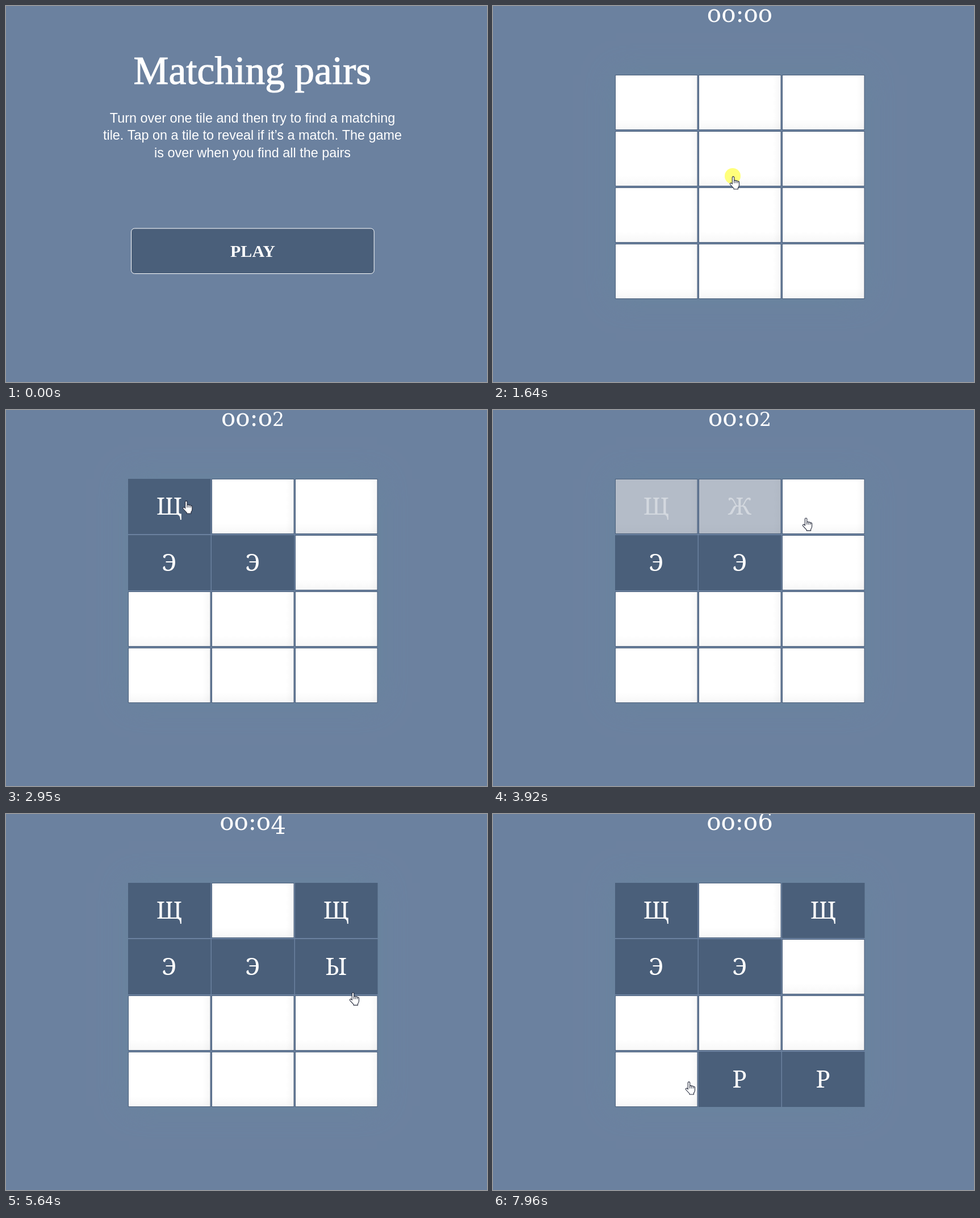
An HTML page with a canvas for the animation above (8 s loop, 847 by 661 pixels).

```html
<!DOCTYPE html>
<html lang="en">
<head>
<meta charset="utf-8">
<title>Matching pairs</title>
<style>
  html, body { margin: 0; width: 100%; height: 100%; overflow: hidden; background: #6b819f; }
  canvas { display: block; }
</style>
</head>
<body>
<canvas id="stage" width="847" height="661"></canvas>
<script>
const ctx = document.getElementById('stage').getContext('2d');
const LOOP = 8000, STEP = 70, GAME_START = 880;
const BACK = '#6b819f', DARK = '#4a5f7a';
const SANS = '"Liberation Sans", Arial, sans-serif';
const ROMAN = '"Liberation Serif", Georgia, serif';
const SERIF = '"Noto Serif", Georgia, serif';
const FIGURES = '"DejaVu Serif", Georgia, serif';

// Key points of the pointer; a string marks a click and names the letter it uncovers
const story = [
  [130, 635, 597], [540, 460, 432], [810, 460, 432, ''], [1090, 453, 437], [1440, 423, 300],
  [1640, 423, 300, 'Э'], [1930, 365, 309], [2270, 292, 285, 'Э'],
  [2740, 312, 161, 'Щ'], [2950, 317, 160], [3220, 472, 178], [3360, 472, 178, 'Ж'],
  [3920, 551, 190], [4090, 557, 252], [4220, 564, 190, 'Щ'], [4500, 564, 190],
  [4960, 305, 185, 'Щ'], [5300, 384, 298], [5480, 600, 292, 'Ы'], [5640, 611, 314],
  [6130, 588, 363, 'Ф'], [6460, 501, 430], [6680, 501, 430], [6790, 571, 466],
  [7000, 572, 476, 'Р'], [7540, 445, 463, 'Р'], [7760, 445, 463], [7960, 345, 471]
].map(([t, x, y, letter]) => ({ t, x, y, letter }));

const clicks = story.filter(key => key.letter !== undefined);

// Letters are turned two at a time; an unequal pair closes again
const turns = clicks.filter(c => c.letter).map((c, i, all) => {
  const first = all[i - i % 2], second = all[i - i % 2 + 1];
  return {
    letter: c.letter,
    tile: Math.floor((c.x - 215) / 147) + 3 * Math.floor((c.y - 121) / 99),
    open: c.t + STEP,
    close: first.letter === second.letter ? Infinity : second.t + 520
  };
});

const hand = new Path2D('M-1.7 13V1.6a1.7 1.7 0 0 1 3.4 0V8a1.6 1.6 0 0 1 3.2 0' +
  'a1.6 1.6 0 0 1 3.1.6a1.5 1.5 0 0 1 2.5.8V14.5q0 3-2 5V22H1V20.5L-5.5 13.5a1.7 1.7 0 0 1 2.4-2.2z');
const knuckles = new Path2D('M1.7 8v3.5M4.9 8.3v3.2M8 9v2.5');
const arrow = new Path2D('M0 0V17L4 13.3L6.7 19.5L9.2 18.4L6.6 12.4H12z');

const clamp = v => Math.max(0, Math.min(1, v));

function text(str, x, y, font, align = 'center') {
  ctx.font = font;
  ctx.textAlign = align;
  ctx.fillStyle = '#fff';
  ctx.fillText(str, x, y);
}

function drawIntro() {
  text('Matching pairs', 434, 137, '69.5px ' + ROMAN);
  ctx.strokeStyle = '#fff';
  ctx.lineWidth = 1;
  ctx.strokeText('Matching pairs', 434, 137);
  ['Turn over one tile and then try to find a matching',
   'tile. Tap on a tile to reveal if it’s a match. The game',
   'is over when you find all the pairs'
  ].forEach((line, i) => text(line, 434, Math.round(205 + i * 30.4), '23.4px ' + SANS));
  ctx.beginPath();
  ctx.roundRect(220.5, 391, 427.7, 79.5, 6);
  ctx.fillStyle = DARK;
  ctx.fill();
  ctx.stroke();
  text('PLAY', 434.5, 441, 'bold 30px ' + ROMAN);
}

// Old-style figures: low 0-2, hanging 3-5, tall 6
function drawTimer(seconds) {
  const glyphs = ['o', 'o', ':', 'o', seconds ? String(seconds) : 'o'].map(ch => {
    const font = ('12'.includes(ch) ? 33 : 42) + 'px ' + FIGURES;
    ctx.font = font;
    return { ch, font, drop: '345'.includes(ch) ? 7 : 0, width: ctx.measureText(ch).width };
  });
  let x = 434.5 - glyphs.reduce((sum, g) => sum + g.width, 0) / 2;
  for (const g of glyphs) {
    text(g.ch, x, 27.5 + g.drop, g.font, 'left');
    x += g.width;
  }
}

// Soft inner shade along the right or the bottom edge
function shadeEdge(x, y, w, h, dx, dy) {
  const shade = ctx.createLinearGradient(x + w - dx, y + h - dy, x + w, y + h);
  shade.addColorStop(0, 'rgba(0,0,0,0)');
  shade.addColorStop(1, 'rgba(0,0,0,.03)');
  ctx.fillStyle = shade;
  ctx.fillRect(x, y, w, h);
}

function drawTile(i, t) {
  const x = 215 + (i % 3) * 147, y = 121 + Math.floor(i / 3) * 99;
  const turn = turns.find(u => u.tile === i && t >= u.open && t < u.close + STEP);
  const open = turn ? clamp(Math.min(t - turn.open, turn.close + STEP - t) / STEP) : 0;
  ctx.fillStyle = DARK;
  ctx.fillRect(x, y, 145.5, 97);
  ctx.globalAlpha = 1 - open;
  ctx.fillStyle = '#fff';
  ctx.fillRect(x + 1, y + 1, 143.5, 95);
  shadeEdge(x + 1, y + 1, 143.5, 95, 14, 0);
  shadeEdge(x + 1, y + 1, 143.5, 95, 0, 18);
  ctx.globalAlpha = open;
  if (turn) text(turn.letter, x + 72.3, y + 63, '42px ' + SERIF);
  ctx.globalAlpha = 1;
}

function drawBoard(t) {
  ctx.save();
  ctx.shadowColor = 'rgba(100,135,155,.5)';
  ctx.shadowBlur = 50;
  ctx.fillStyle = BACK;
  ctx.fillRect(216, 122, 438, 392);
  ctx.restore();
  for (let i = 0; i < 12; i++) drawTile(i, t);
  drawTimer(Math.max(0, Math.floor((t - 916) / 1014)));
}

// Speed through a key point; zero where the pointer rests
function speed(i, axis) {
  const before = story[i - 1], key = story[i], after = story[i + 1];
  if (!before || !after) return 0;
  const rise = key[axis] - before[axis], next = after[axis] - key[axis];
  return rise * next <= 0 ? 0 : (rise + next) / (after.t - before.t);
}

function pointerAt(t, axis) {
  const i = story.findLastIndex(key => key.t <= t), a = story[i], b = story[i + 1];
  if (!b) return a[axis];
  const span = b.t - a.t, k = (t - a.t) / span, r = 1 - k;
  return r * r * ((1 + 2 * k) * a[axis] + k * span * speed(i, axis)) +
         k * k * ((1 + 2 * r) * b[axis] - r * span * speed(i + 1, axis));
}

function drawPointer(t) {
  if (t < story[0].t) return;
  const x = pointerAt(t, 'x'), y = pointerAt(t, 'y');
  if (clicks.some(c => t >= c.t && t < c.t + 2 * STEP)) {
    ctx.fillStyle = 'rgba(255,255,90,.8)';
    ctx.beginPath();
    ctx.arc(x - 1, y - 1, 14, 0, 7);
    ctx.fill();
  }
  const isArrow = t < GAME_START && y > 470;
  const shape = isArrow ? arrow : hand;
  ctx.save();
  ctx.translate(x, y);
  ctx.fillStyle = '#fff';
  ctx.strokeStyle = '#23283a';
  ctx.lineWidth = 1.1;
  ctx.lineJoin = 'round';
  ctx.fill(shape);
  ctx.stroke(shape);
  if (!isArrow) ctx.stroke(knuckles);
  ctx.restore();
}

const began = performance.now();

function draw() {
  const t = (performance.now() - began) % LOOP;
  ctx.fillStyle = BACK;
  ctx.fillRect(0, 0, 847, 661);
  if (t < GAME_START) drawIntro();
  else drawBoard(t);
  drawPointer(t);
  requestAnimationFrame(draw);
}
draw();
</script>
</body>
</html>
```
